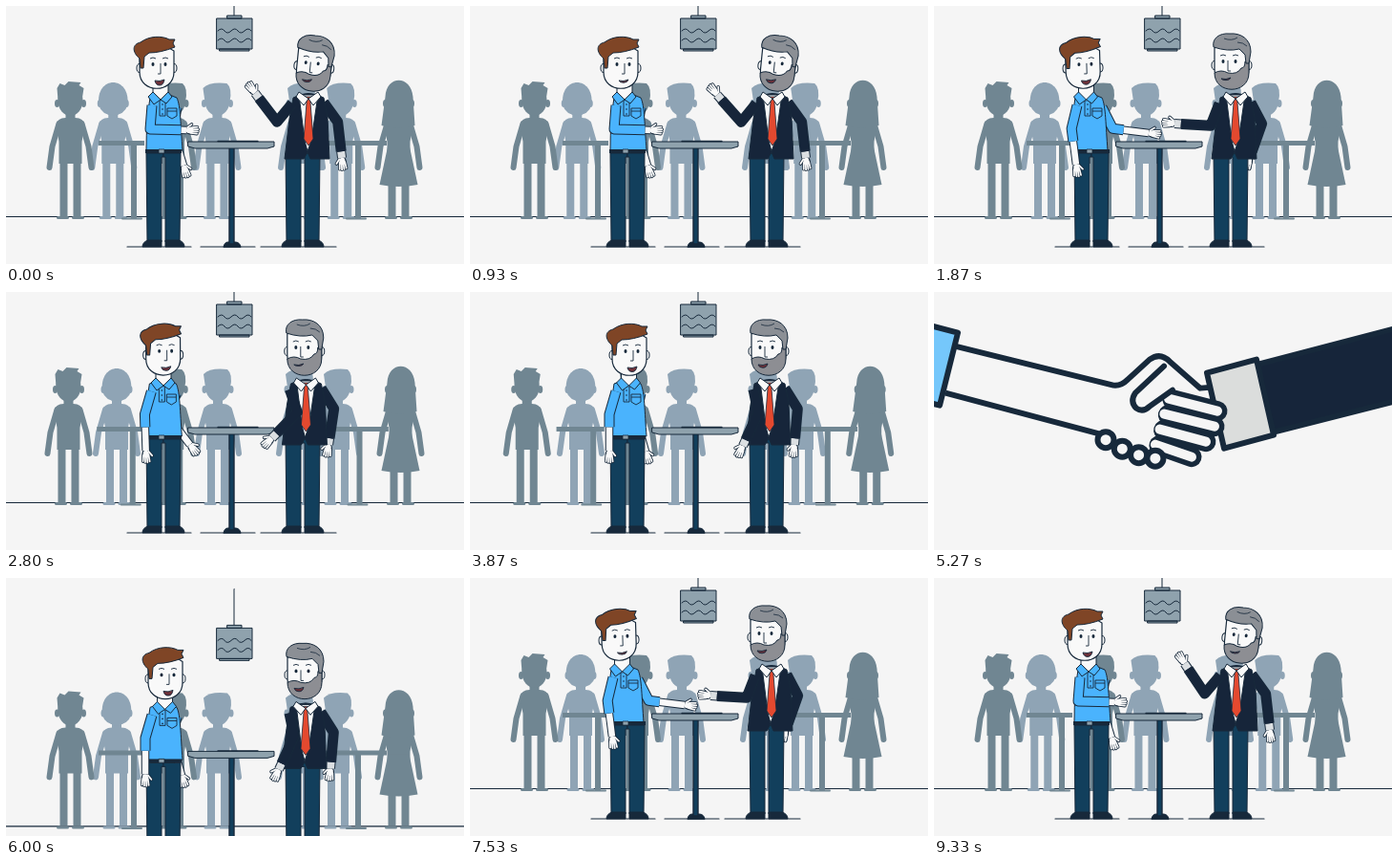
These frames come from a looping animation (480 by 270 pixels, 9390 ms). An HTML page with a canvas:

```html
<!DOCTYPE html>
<html lang="en">
<head>
<meta charset="utf-8">
<title>Handshake</title>
<style>
html, body { margin: 0; width: 100%; height: 100%; overflow: hidden; background: #f5f5f5; }
canvas { display: block; width: 480px; height: 270px; }
</style>
</head>
<body>
<canvas id="stage"></canvas>
<script>
const LOOP = 9390;
const INK = '#17293b', PAPER = '#f5f5f5', SHIRT = '#4ab3fd', NAVY = '#123f5c', SUIT = '#16253a';
const SKIN = '#f9f9f9', STEEL = '#8fa2ad', DUSK = '#708692', MIST = '#8fa4b5';

const canvas = document.getElementById('stage');
const ratio = window.devicePixelRatio || 1;
canvas.width = 480 * ratio;
canvas.height = 270 * ratio;
const ctx = canvas.getContext('2d');
ctx.lineJoin = 'round';

const clamp = v => Math.max(0, Math.min(1, v));
const mix = (a, b, k) => a + (b - a) * k;
function ramp(t, from, to) {
  const v = clamp((t - from) / (to - from));
  return v * v * (3 - 2 * v);
}

function shape(d, fill, width = 1, color = INK) {
  const path = new Path2D(d);
  if (fill) { ctx.fillStyle = fill; ctx.fill(path); }
  if (width) { ctx.lineWidth = width; ctx.strokeStyle = color; ctx.stroke(path); }
}
function line(points, width, color, cap = 'round') {
  ctx.beginPath();
  for (let i = 0; i < points.length; i += 2) ctx.lineTo(points[i], points[i + 1]);
  ctx.lineCap = cap;
  ctx.lineWidth = width;
  ctx.strokeStyle = color;
  ctx.stroke();
}
function oval(x, y, rx, ry, fill, width = 0) {
  ctx.beginPath();
  ctx.ellipse(x, y, rx, ry, 0, 0, 7);
  ctx.fillStyle = fill;
  ctx.fill();
  if (width) { ctx.lineWidth = width; ctx.strokeStyle = INK; ctx.stroke(); }
}
function at(x, y, draw, angle = 0) {
  ctx.save();
  ctx.translate(x, y);
  ctx.rotate(angle);
  draw();
  ctx.restore();
}

// Each pose: head x, y, tilt; torso centre; left wrist; right wrist
const poses = {
  talk: { guy: [158, 63, 0, 166, 189, 130, 186, 167], boss: [323, 62, .1, 317, 261, 91, 352, 159] },
  offer: { guy: [156, 63, -.03, 163, 149, 166, 225, 133], boss: [312, 60, 0, 316, 252, 123, 331, 159] },
  rest: { guy: [167, 64, 0, 166, 146, 166, 184, 167], boss: [313, 60, 0, 314, 286, 161, 340, 160] }
};
const cues = [[1100, 1500, 'offer'], [2450, 2950, 'rest'], [6450, 6950, 'offer'], [8250, 8700, 'talk']];

function poseAt(t) {
  let from = 'talk', to = 'talk', k = 0;
  for (const [start, end, name] of cues) {
    if (t < start) break;
    [from, to, k] = [to, name, ramp(t, start, end)];
  }
  const blend = who => poses[from][who].map((v, i) => mix(v, poses[to][who][i], k));
  const talk = (from === 'talk' ? 1 - k : 0) + (to === 'talk' ? k : 0);
  const boss = blend('boss');
  const wave = 3 * talk * Math.sin(t / LOOP * 28 * Math.PI);
  boss[4] -= wave;
  boss[5] += wave;
  return { guy: blend('guy'), boss, talk };
}

function silhouette(x, color, kind) {
  at(x, 0, () => {
    for (const side of [-1, 1]) {
      line([7 * side, 155, 7 * side, 220], 8, color, 'butt');
      line([3 * side, 221.5, 13 * side, 221.5], 3, color);
      line([12 * side, 123, 19 * side, 147, 22 * side, 169], 6, color);
      oval(14 * side, 102, 2.5, 4, color);
    }
    shape('M-5 108 H5 V117 Q14 117 15 125 L12 142 V165 H-12 V142 L-15 125 Q-14 117 -5 117 Z', color, 0);
    oval(0, 99, 13, 16, color);
    if (kind === 'spiky') shape('M-13 99 L-14 86 L-11 81 L-6 83 L-2 79 L11 80 L9 83 L14 86 L12 99 Z', color, 0);
    if (kind === 'bob') shape('M-15 104 C-19 72 19 72 15 104 Q12 114 0 114 Q-12 114 -15 104 Z', color, 0);
    if (kind === 'short') shape('M-13 100 L-15 86 Q-8 79 10 81 Q16 86 13 100 Z', color, 0);
    if (kind === 'dress') {
      shape('M-14 95 C-13 72 13 72 15 95 L17 125 Q0 131 -18 125 Z', color, 0);
      shape('M-11 145 H11 L20 187 Q0 191 -20 187 Z', color, 0);
    }
  });
}
function crowd(talk, spread) {
  const near = x => 240 + (x - 240) * (1 + .045 * spread);
  const far = x => 240 + (x - 240) * (1 + .03 * talk);
  silhouette(far(116), MIST, 'bob');
  for (const x of [222, 308, 348]) silhouette(far(x), MIST, 'short');
  silhouette(near(175), DUSK, 'short');
  for (const [left, right, post] of [[97, 145, 134], [335, 399, 369]]) {
    line([near(left), 143.5, near(right), 143.5], 5, DUSK, 'butt');
    line([near(post), 145, near(post), 222], 6, DUSK, 'butt');
    line([near(post) - 12, 222.5, near(post) + 8, 222.5], 2, DUSK);
  }
  silhouette(near(67.5), DUSK, 'spiky');
  silhouette(near(411.5), DUSK, 'dress');
}

function lamp() {
  line([239, -28, 239, 11], 1, INK);
  shape('M232 10 H247 V13 H232 Z M224 45 H255 V47 H224 Z M221 13 H258 V45 H221 Z', STEEL);
  for (const y of [26, 36]) shape(`M222 ${y} q4 -4 7 0 t7 0 t7 0 t7 0 t7 0`, null);
}
function table() {
  shape('M228 252 Q229 247 233 247 H240 Q245 247 246 252 Z', INK);
  shape('M234 148 H239 V249 H234 Z', NAVY, 1.4);
  shape('M191 142 H281 V147 L274 149 H198 L191 147 Z', STEEL);
  line([222, 141.5, 264, 141.5], 1.3, INK);
}

function limb(points, width, color, cap = 'butt') {
  line(points, width + 2, INK, cap);
  line(points, width, color, cap);
}
function hand(flip) {
  ctx.scale(.9, .9 * flip);
  const fingers = [[1, -3, 6, -7]];
  for (let i = 0; i < 4; i++) fingers.push([5, 2 * i - 3, 14 - Math.abs(i - 1.3), 2.6 * i - 4]);
  oval(4, 0, 5, 4, SKIN, 1.6);
  for (const f of fingers) line(f, 3.8, INK);
  for (const f of fingers) line(f, 2, SKIN);
  oval(4, 0, 4.4, 3.4, SKIN);
}
// Two-bone arm: the elbow follows from the shoulder and the wrist
function arm(sx, sy, wx, wy, bend, color, sleeve, cuff) {
  const upper = 25, lower = 38;
  const reach = Math.min(Math.hypot(wx - sx, wy - sy), upper + lower - .2);
  const corner = Math.acos((upper ** 2 + reach ** 2 - lower ** 2) / (2 * upper * reach));
  const angle = Math.atan2(wy - sy, wx - sx) + bend * corner;
  const ex = sx + upper * Math.cos(angle), ey = sy + upper * Math.sin(angle);
  const cx = mix(ex, wx, sleeve), cy = mix(ey, wy, sleeve);
  at(wx, wy, () => hand(bend), Math.atan2(wy - ey, wx - ex));
  limb([cx, cy, wx, wy], cuff ? 8 : 6.5, cuff || SKIN);
  limb([sx, sy, ex, ey, cx, cy], 9, color);
}

function legs(center) {
  for (const side of [-1, 1]) at(center, 0, () => {
    ctx.scale(side, 1);
    shape('M2 158 V247 H17 L18 154 H0 V158 Z', NAVY);
    shape('M2 252 V245 H16 Q22 247 22 252 Z', INK);
  });
}
function face(dir, blink) {
  for (const side of [-1, 1]) oval(18 * side, 2, 3, 4.5, SKIN, 1);
  shape('M-18 -16 V6 C-18 29 18 29 18 6 V-16 Q0 -28 -18 -16 Z', SKIN, 1.2);
  for (const x of [-4, 9]) {
    oval(x * dir, -2, 1.5, 1.6 * blink + .3, INK);
    shape(`M${x * dir - 3} -8 q3 -2 6 0`, null, .9);
  }
  shape(`M${4 * dir} -3 V8 H${dir}`, null, .9);
}
function mouth(x, y, open) {
  shape(`M${x - 5} ${y} q5 1.5 10 -1 q-1 ${6 * open} -5 ${6 * open} q-4 0 -5 ${1 - 6 * open} Z`, '#6d3038', .9);
}

function guy([x, y, tilt, torso, lx, ly, rx, ry], talk, t, blink) {
  arm(torso + 13, 106, rx, ry, 1, SHIRT, .3);
  legs(165);
  at(torso, 0, () => {
    shape('M-15 96 Q0 89 13 96 C17 104 17 125 19 151 H-19 Q-19 118 -15 96 Z', SHIRT);
    shape('M3 107 h10 v8 l-5 3 l-5 -3 Z M3 110 h10', null, .9);
    shape('M-5 98 v17 h6 v-17', SHIRT, .9);
    for (const by of [103, 108, 113]) oval(-2, by, .8, .8, INK);
  });
  shape('M146 150 H184 V154 H146 Z', INK, 0);
  shape('M160 150 h6 v4 h-6 Z', STEEL, .8);
  at(mix(x, torso, .5), 0, () => {
    shape('M-8 82 H8 V93 L0 99 L-8 93 Z', SKIN);
    shape('M-8 90 L0 98 L-7 103 L-13 95 Z M8 90 L0 98 L6 102 L12 95 Z', SHIRT);
  });
  at(x, y, () => {
    face(1, blink);
    shape('M-17 2 L-18 -8 C-26 -15 -26 -23 -17 -25 C-8 -32 6 -32 13 -28 L19 -28 L17 -24 L19 -20 Q4 -14 -8 -14 L-13 -10 L-14 2 Z', '#7f4526');
    mouth(3, 15, .75 + .25 * Math.cos(t / 105));
  }, tilt);
  arm(torso - 13, 104, lx, ly, 1, SHIRT, mix(.35, .85, talk));
}

function boss([x, y, tilt, torso, lx, ly, rx, ry], t, blink) {
  const cuff = '#dbdfe2';
  arm(torso + 16, 101, rx, ry, -1, SUIT, .82, cuff);
  legs(311);
  at(torso, 0, () => {
    shape('M-16 96 Q0 87 16 96 L20 116 L22 160 H2 L-1 153 L-5 160 H-25 L-20 118 Z', SUIT);
    shape('M-10 93 H10 L3 141 L-1 152 L-4 141 Z', SKIN);
    shape('M-3 95 h6 l-1 6 l3 38 l-5 7 l-5 -7 l3 -38 Z', '#e4492f', .8);
    shape('M-10 90 L0 97 L-5 104 L-13 95 Z M10 90 L0 97 L5 104 L13 95 Z', SKIN);
  });
  arm(torso - 17, 102, lx, ly, -1, SUIT, .82, cuff);
  at(x, y, () => {
    face(-1, blink);
    shape('M18 -2 V10 C18 33 -18 33 -18 10 Q-11 6 -4 10 Q6 12 10 5 Q14 5 14 -2 Z', '#8d8e93');
    shape('M18 0 L20 -12 C20 -26 9 -32 -2 -31 C-13 -32 -21 -26 -19 -17 Q-4 -12 8 -15 L14 -9 L15 0 Z', '#8b8f95');
    shape('M-8 -26 q8 3 14 -1 M6 -22 q6 0 10 4', null, .8);
    mouth(-6, 16, .55 + .2 * Math.sin(t / 115));
  }, tilt);
}

function room(t) {
  const pose = poseAt(t);
  const spread = t < 5000 ? ramp(t, 2300, 3800) : 0;
  const blink = clamp(Math.abs(t % 2600 - 500) / 70);
  lamp();
  line([0, 220.5, 480, 220.5], 1.1, INK);
  crowd(pose.talk, spread);
  for (const [a, b] of [[127, 194], [204, 261], [267, 346]]) line([a, 252, b, 252], 1.2, INK);
  table();
  boss(pose.boss, t, blink);
  guy(pose.guy, pose.talk, t, blink);
}

function burst(t) {
  const p = (t - 4250) / 150;
  if (p <= 0 || p >= 2) return;
  function ray(x, y, length) {
    const start = length * clamp(p - 1), end = length * clamp(p);
    const deep = x === 0 || (x > 0 && y < 0);
    at(244 + x, 134 + y, () => line([start, 0, end, 0], 2.6, deep ? '#1976ae' : '#70c4ee'), Math.atan2(y, 1.2 * x));
  }
  for (const side of [-1, 0, 1]) for (const level of [-1, 1]) {
    ray(31 * side, level * (side ? 75 : 79), side ? 12 : 8);
    if (side) ray(57 * side, 51 * level, 4);
  }
}
function handshake(t) {
  const gap = 280 * (1 - ramp(t, 3920, 4260));
  const since = Math.max(0, t - 4400) / 1000;
  const shake = 9 * Math.sin(since * 15) * Math.exp(-since * 2.2);
  burst(t);
  at(-gap, shake, () => {
    shape('M12 105 L172 148 L240 170 L285 150 L292 112 L279 100 L247 72 Q237 62 226 70 L203 91 Q196 98 188 97 L18 55 Z', PAPER, 0);
    shape('M18 55 L188 97 Q196 98 203 91 L226 70 Q237 62 247 72 L279 100 L292 99 M12 105 L174 148', null, 6);
    shape('M-300 -42 L25 42 L6 118 L-300 42 Z', '#75c7fb', 6);
  });
  at(gap, shake, () => {
    shape('M336 76 L780 -40 V38 L356 146 Z', SUIT, 6);
    shape('M286 84 L338 70 L356 149 L304 163 Z', '#dbdddc', 6);
    for (let i = 3; i >= 0; i--) {
      const x = 250 - 4.7 * i, y = 112 + 16 * i, tip = 297 - 3 * i * i;
      line([x, y, tip, y + 12], 21, INK);
      line([x - 4, y - 1, tip, y + 12], 10, PAPER);
    }
    ctx.lineCap = 'round';
    shape('M241 77 L211 105 Q205 114 212 121 Q219 126 226 119 L250 102', PAPER, 6);
    for (let i = 0; i < 4; i++) oval(180 + 17.3 * i, 154 + 11 * i - 1.5 * i * i, 8.5, 8.5, PAPER, 6);
  });
}

function render(t) {
  ctx.setTransform(ratio, 0, 0, ratio, 0, 0);
  ctx.fillStyle = PAPER;
  ctx.fillRect(0, 0, 480, 270);
  const drop = t < 5000 ? 270 * ramp(t, 3880, 4140) : 270 * (1 - clamp((t - 5750) / 530)) ** 3;
  if (t > 3900 && t < 6300) at(0, t > 5700 ? drop - 270 : 0, () => handshake(t));
  if (drop < 270) at(0, drop, () => room(t));
}
function tick() {
  render(performance.now() % LOOP);
  requestAnimationFrame(tick);
}
tick();
</script>
</body>
</html>
```
